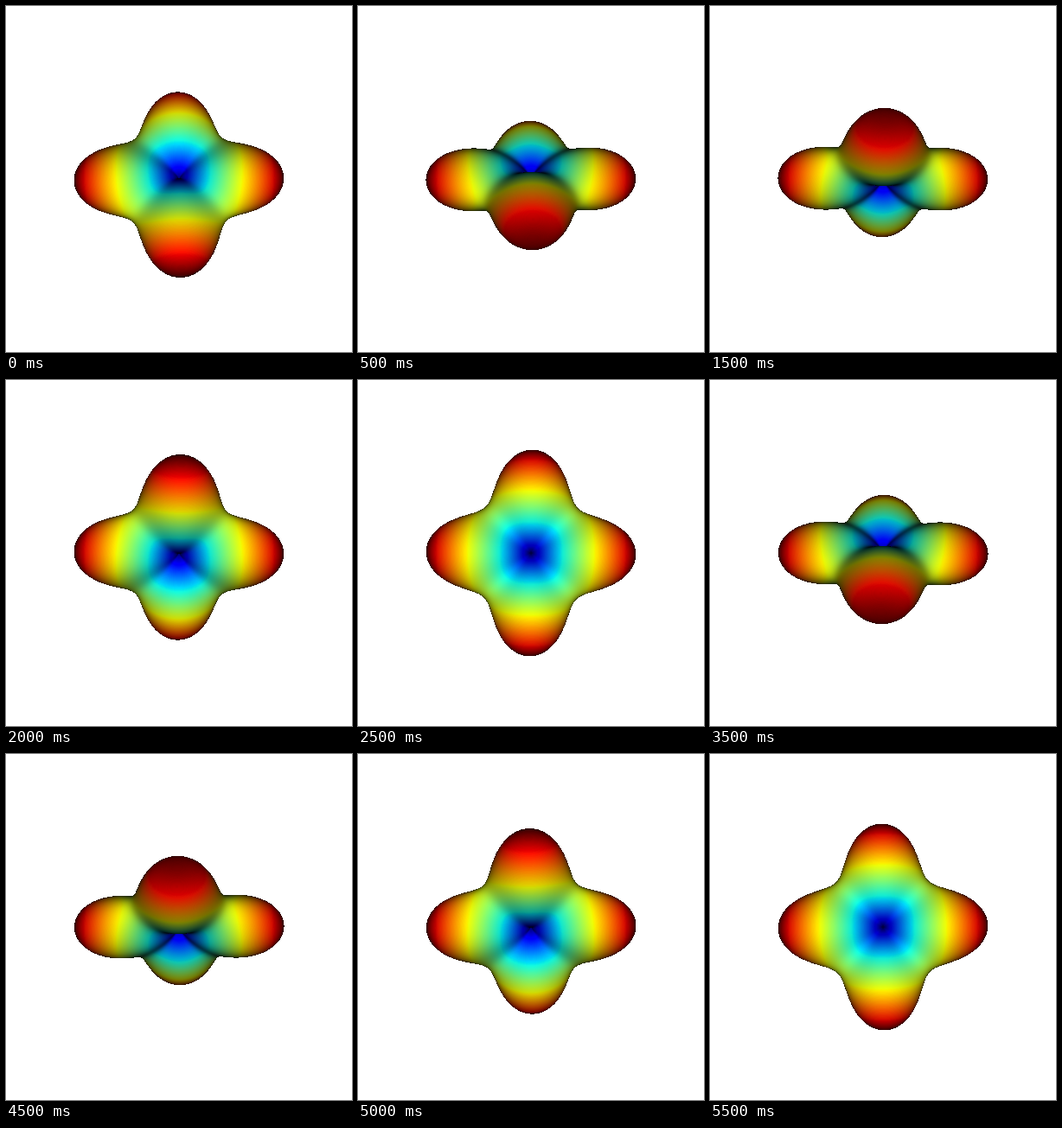
Recreate the animation shown at these times as a matplotlib script. Size 400 by 400 pixels, loop 6000 ms.

```python
import numpy as np
import matplotlib.pyplot as plt
from matplotlib.animation import FuncAnimation

SIZE = 400
FRAMES, INTERVAL = 12, 500
CAMERA = 6.17                       # camera distance in units of the lobe length
FOCAL = 200 / np.tan(np.radians(15))
SKEW = np.exp(1j * np.radians(0.9))  # small turn of the lobes in their own plane
SQUASH = 0.985
ROUND, CROSS = 0.8125, 0.1875       # r = sin(theta)^4 * (ROUND + CROSS * cos(4 phi))
JET = plt.get_cmap("jet")


def to_body(x, y, z, tilt):
    """Turn camera space into the surface's own axes."""
    c, s = np.cos(tilt), np.sin(tilt)
    u, v, w = x, c * y + s * z, c * z - s * y
    plane = (u + 1j * v / SQUASH) * SKEW
    return plane.real, plane.imag, w


def field(x, y, z, tilt):
    """Negative inside the surface, zero on it."""
    u, v, w = to_body(x, y, z, tilt)
    uu, vv = u * u, v * v
    rho2 = uu + vv
    lobes = ROUND * rho2**2 + CROSS * (rho2**2 - 8 * uu * vv)
    r2 = rho2 + w * w
    return r2 * r2 * np.sqrt(r2) - lobes


def pixel_rays():
    axis = (np.arange(SIZE) + 0.5 - SIZE / 2) / FOCAL
    sx, sy = np.meshgrid(axis, -axis)
    near = np.hypot(sx, sy) * FOCAL < 128
    return near, sx[near], sy[near]


NEAR, SX, SY = pixel_rays()
DEPTHS = np.linspace(1.06, -1.06, 150)


def along(z):
    return SX * (CAMERA - z), SY * (CAMERA - z), z


def first_hit(tilt):
    hit = np.zeros(SX.size, bool)
    front = np.full(SX.size, DEPTHS[0])
    back = front.copy()
    for previous, depth in zip(DEPTHS, DEPTHS[1:]):
        entered = ~hit & (field(*along(depth), tilt) < 0)
        front[entered], back[entered] = previous, depth
        hit |= entered
    for _ in range(16):
        middle = (front + back) / 2
        inside = field(*along(middle), tilt) < 0
        back = np.where(inside, middle, back)
        front = np.where(inside, front, middle)
    return hit, back


def render(frame):
    tilt = np.radians(30 * (5 - frame))
    hit, depth = first_hit(tilt)
    p = [c[hit] for c in along(depth)]

    eps = 1e-4
    normal = []
    for step in np.eye(3) * eps:
        ahead = [c + d for c, d in zip(p, step)]
        behind = [c - d for c, d in zip(p, step)]
        normal.append(field(*ahead, tilt) - field(*behind, tilt))
    normal = np.array(normal)
    light = np.clip(normal[2] / (np.linalg.norm(normal, axis=0) + 1e-15), 0, 1)

    radius = np.sqrt(sum(c * c for c in to_body(*p, tilt)))
    colours = np.ones((SX.size, 3))
    colours[hit] = JET(np.clip(radius, 0, 1))[:, :3] * light[:, None]
    image = np.ones((SIZE, SIZE, 3))
    image[NEAR] = colours
    return image


fig = plt.figure(figsize=(4, 4), dpi=100, facecolor="white")
ax = fig.add_axes([0, 0, 1, 1])
ax.axis("off")
picture = ax.imshow(np.ones((SIZE, SIZE, 3)), interpolation="nearest", aspect="auto")


def update(frame):
    picture.set_data(render(frame))
    return [picture]


animation = FuncAnimation(fig, update, frames=FRAMES, interval=INTERVAL,
                          repeat=True, repeat_delay=0, blit=False)
plt.show()
```
